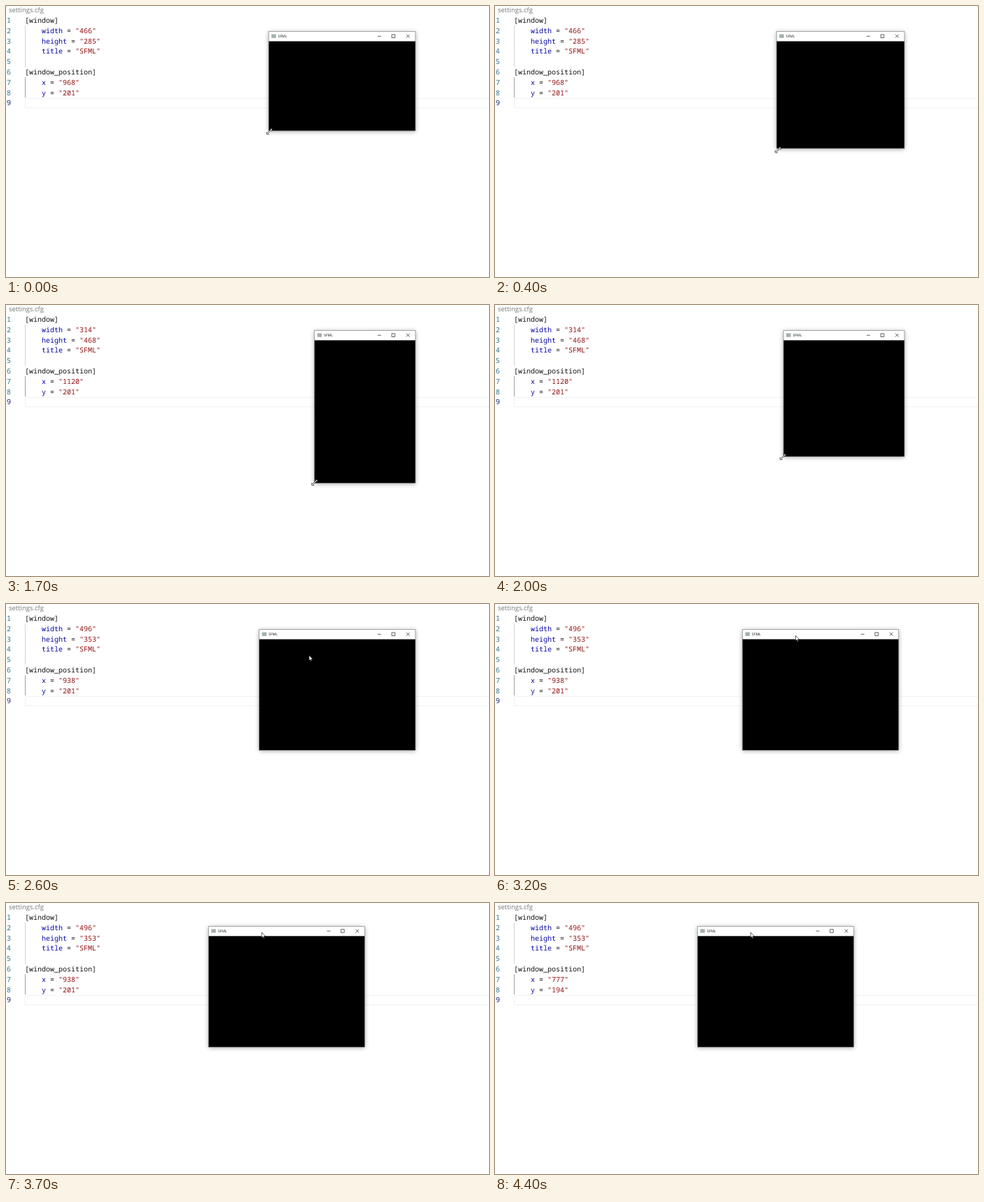
An HTML page that plays this animation: 690x388 px, repeating every 4.5 s.

```html
<!DOCTYPE html>
<html lang="en">
<head>
<meta charset="utf-8">
<title>settings.cfg</title>
<style>
  html, body { margin: 0; width: 100%; height: 100%; overflow: hidden; background: #fff; }
  svg { display: block; width: 100vw; height: 100vh; }
  text { white-space: pre; text-rendering: geometricPrecision; }
  .tab { font: 9.5px "Open Sans", sans-serif; fill: #777; }
  .code { font: 10px "Noto Sans Mono", monospace; fill: #111; }
  .num { fill: #2b7590; }
  .num.active { fill: #0b216f; }
  .key { fill: #0808a8; }
  .str { fill: #931212; }
  .caption { font: 5.2px "Open Sans", sans-serif; fill: #111; }
  #frame { fill: #fff; filter: drop-shadow(.7px 1.3px 3px rgba(0, 0, 0, .36)); }
  #edge { fill: none; stroke: #777; stroke-width: .6; }
  .glyph { fill: none; stroke: #222; stroke-width: .7; }
  .pointer { fill: #fff; stroke: #000; stroke-width: .6; stroke-linejoin: round; }
</style>
</head>
<body>
<svg viewBox="0 0 690 388">
  <text class="tab" x="4" y="9.3">settings.cfg</text>
  <path d="M27.5 28V87" stroke="#d3d3d3"/>
  <path d="M27.5 102V131" stroke="#a0a0a0"/>
  <path d="M690 132.3H27.5V145.8H690" fill="none" stroke="#f0f0f0"/>
  <g id="editor" class="code"></g>

  <g id="win">
    <rect id="frame"/>
    <rect id="client"/>
    <rect id="edge"/>
    <rect x="4" y="4" width="6.5" height="5.3" fill="#a3b0ad"/>
    <text class="caption" x="13.4" y="8.7">SFML</text>
    <path id="buttons" class="glyph" d="M-54 6.8h5M-33.8 4.4h4.6v4.6h-4.6zM-13 4.3l4.8 4.8m0-4.8l-4.8 4.8"/>
  </g>

  <path id="resizer" class="pointer" d="M4-4V-.8L2.9-1.9-1.9 2.9-.8 4H-4V.8L-2.9 1.9 1.9-2.9.8-4Z"/>
  <path id="arrow" class="pointer" d="M0 0V7.6L1.7 6 2.9 8.6 4 8.1 2.9 5.6 5.2 5.4Z"/>
</svg>
<script>
const LOOP = 4500, STEP = 100;
const SCALE = 0.45, BAR = 14;             // desktop pixels to stage, title bar height
const RIGHT = 1434, DRAG = 3100, RELEASE = 2400;
const SAVES = [0, 1300, RELEASE, 4000];   // when the settings file is rewritten
const $ = id => document.getElementById(id);

// Window on the desktop: [time, x, y, height]
const poses = [
  [0, 968, 201, 285], [400, 1028, 201, 341], [900, 1108, 201, 453],
  [1200, 1120, 201, 468], [1600, 1120, 201, 468], [2000, 1050, 201, 370],
  [2300, 938, 201, 353], [DRAG, 938, 201, 353], [3400, 845, 200, 353], [3700, 777, 194, 353]
];

// Free pointer on the stage: [time, x, y]
const hover = [[2300, 363, 210], [2600, 433, 73.5], [3000, 438, 45]];

// Monotone cubic through the key points
function curve(keys, t) {
  const last = keys.length - 1;
  const end = keys.findIndex(key => key[0] > t);
  if (end <= 0) return keys[end < 0 ? last : 0].slice(1);
  const i = end - 1;
  const slope = (n, c) => n < 0 || n >= last ? 0
    : (keys[n + 1][c] - keys[n][c]) / (keys[n + 1][0] - keys[n][0]);
  const tangent = (n, c) => {
    const a = slope(n - 1, c), b = slope(n, c);
    return a * b > 0 ? 2 * a * b / (a + b) : 0;
  };
  const span = keys[end][0] - keys[i][0], k = (t - keys[i][0]) / span;
  return keys[i].slice(1).map((from, n) => {
    const c = n + 1, ease = k * k * (3 - 2 * k);
    return from + (keys[end][c] - from) * ease +
      span * k * (1 - k) * ((1 - k) * tangent(i, c) - k * tangent(end, c));
  });
}

// Resizing keeps the right edge fixed; dragging keeps the width
function pose(t) {
  const [x, y, height] = curve(poses, t);
  return { x, y, height, width: RIGHT - (t < DRAG ? x : poses[7][1]) };
}

function box(t) {
  const p = pose(t);
  return {
    x: p.x * SCALE - 60.4, y: p.y * SCALE - 53.95,
    w: p.width * SCALE, h: p.height * SCALE + BAR
  };
}

function set(el, attrs) {
  for (const name in attrs) el.setAttribute(name, attrs[name]);
}

const place = (el, x, y) => set(el, { transform: `translate(${x} ${y})` });

const fields = {};
function buildEditor() {
  const lines = ["[window]", "width", "height", "title", "", "[window_position]", "x", "y", ""];
  $("editor").innerHTML = lines.map((line, i) => {
    const y = 24 + i * 14.8;
    const num = `<text class="num${i === 8 ? " active" : ""}" x="1" y="${y}">${i + 1}</text>`;
    if (!line) return num;
    if (line[0] === "[") return `${num}<text x="27" y="${y}">${line}</text>`;
    return `${num}<text x="51" y="${y}"><tspan class="key">${line}</tspan> = ` +
      `<tspan class="str" data-field="${line}">"SFML"</tspan></text>`;
  }).join("");
  document.querySelectorAll("[data-field]").forEach(el => fields[el.dataset.field] = el);
}

function drawPointer(t, { x, y }) {
  const sizing = t < RELEASE;
  $("resizer").style.display = sizing ? "" : "none";
  $("arrow").style.display = sizing ? "none" : "";
  if (sizing) {
    const lead = box(t + 15);  // the window trails the pointer slightly
    place($("resizer"), lead.x + 1, lead.y + lead.h + 1);
  } else if (t < DRAG) {
    place($("arrow"), ...curve(hover, t));
  } else {
    place($("arrow"), x + 76, y + 8.8);
  }
}

function draw(t) {
  const b = box(t);
  place($("win"), b.x, b.y);
  set($("frame"), { width: b.w, height: b.h });
  set($("edge"), { width: b.w, height: b.h });
  set($("client"), { y: BAR, width: b.w, height: b.h - BAR });
  place($("buttons"), b.w, 0);
  drawPointer(t, b);

  const saved = pose(SAVES.filter(time => time <= t).pop());
  for (const name of ["width", "height", "x", "y"]) {
    const value = `"${Math.round(saved[name])}"`;
    if (fields[name].textContent !== value) fields[name].textContent = value;
  }
}

buildEditor();
const start = performance.now();
function tick() {
  const t = (performance.now() - start) % LOOP;
  draw(Math.floor(t / STEP) * STEP);
  requestAnimationFrame(tick);
}
tick();
</script>
</body>
</html>
```
